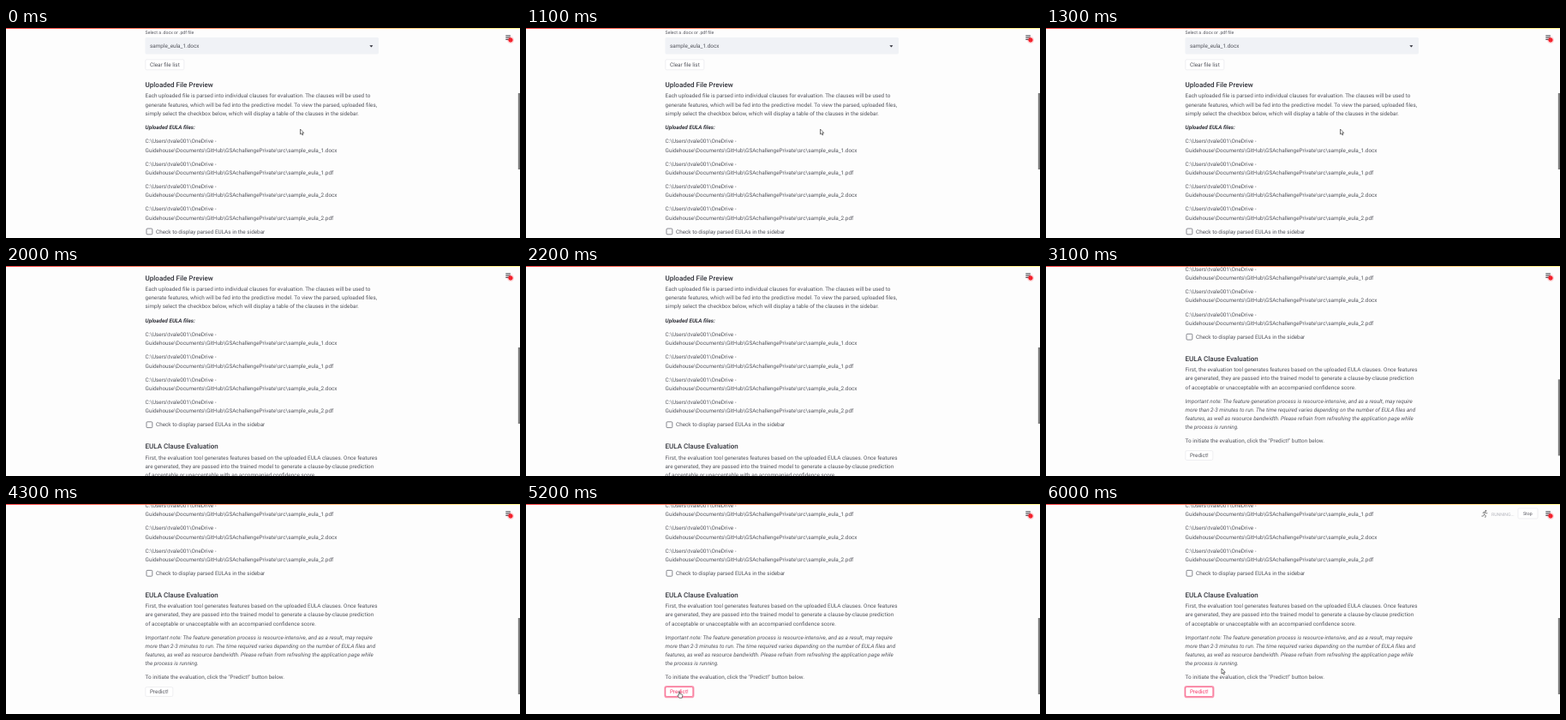
An HTML page for the animation above (6100 ms loop, 600 px wide and 245 px high).

```html
<!DOCTYPE html>
<html lang="en">
<head>
<meta charset="utf-8">
<title>Clause evaluation</title>
<style>
  html, body { margin: 0; width: 100%; height: 100%; overflow: hidden; background: #fdfdfd; }
  svg { display: block; width: 600px; height: 245px; }
  text { font: 6.36px Roboto, sans-serif; fill: #54555d; white-space: pre; text-rendering: geometricPrecision; }
  .head { font-size: 8px; font-weight: 500; fill: #33343c; }
  .label { font-size: 5.2px; }
  .note { font-style: italic; }
  .strong { font-style: italic; font-weight: 700; fill: #33343c; }
  .box { fill: #fff; stroke: #e4e5ea; stroke-width: .6; }
  .hot .box { stroke: #f63366; }
  .hot text { fill: #f63366; }
</style>
</head>
<body>
<svg viewBox="0 0 600 245">
  <defs>
    <linearGradient id="bar"><stop stop-color="#f6403f"/><stop offset="1" stop-color="#fff38a"/></linearGradient>
    <radialGradient id="glow"><stop offset=".5" stop-color="#f5222d"/><stop offset=".6" stop-color="#f5222d" stop-opacity=".3"/><stop offset="1" stop-color="#f5222d" stop-opacity="0"/></radialGradient>
  </defs>
  <g id="page">
    <rect x="162.5" y="11" width="272.5" height="19.5" rx="1.5" fill="#f0f2f6"/>
    <path d="M424.4 20.2h4l-2 2.2z" fill="#262730"/>
    <rect class="box" x="162.8" y="36.8" width="45" height="12" rx="1.5"/>
    <rect x="164" y="234" width="6.8" height="6.8" rx="1" fill="#fff" stroke="#6a6b74" stroke-width=".8"/>
    <g id="predict">
      <rect id="ring" x="162.2" y="369.4" width="33.4" height="12.6" rx="2" fill="none" stroke="#f63366" stroke-opacity=".5" stroke-width="1.6"/>
      <rect class="box" x="162.8" y="370.2" width="32" height="11" rx="1.5"/>
    </g>
  </g>
  <rect width="600" height="1" fill="url(#bar)"/>
  <rect id="thumb" x="597.8" y="76" width="2.2" height="89" fill="#7c7c7c"/>
  <path d="M583.3 9h5.6m-5.6 2.2h5.6m-5.6 2.2h5.6" stroke="#33343c" stroke-width="1"/>
  <circle cx="589" cy="14" r="4.6" fill="url(#glow)"/>
  <g id="status">
    <circle cx="513.4" cy="8" r="1" fill="#777"/>
    <path d="M512.6 9.3l-1.2 3 2 1.3-.8 2.4M511.4 12.3l-1 1.8h-2M510 11l.6-1.5 2 -.2 1.2 1.6 1.6-.2" fill="none" stroke="#777" stroke-width=".9"/>
    <rect class="box" x="551" y="5" width="23" height="12" rx="1.5"/>
  </g>
  <g id="cursor" fill="#fff" stroke="#222" stroke-width=".6" stroke-linejoin="round">
    <path id="arrow" d="M0 0v6l1.4-1.2 1 2.2 1-.5-1-2.1h1.8z"/>
    <path id="hand" d="M-.7 0q.7-.6 1.3 0v2.6l2.6.6q.7.3.6 1.2l-.6 2.8h-3.4l-2-2.8q.3-.9 1.5 0z"/>
  </g>
</svg>
<script>
const LOOP = 6100, NOTCH = 52.2;
const $ = id => document.getElementById(id);

// y is the vertical middle of the first line
function write(parent, x, y, lines, cls = '') {
  lines.split('\n').forEach((line, i) => {
    const el = document.createElementNS('http://www.w3.org/2000/svg', 'text');
    el.setAttribute('x', x);
    el.setAttribute('y', y + 2.2 + i * 10.2);
    el.setAttribute('class', cls);
    el.textContent = line;
    $(parent).append(el);
  });
}

const LEFT = 162.6;
write('page', LEFT, 4.6, 'Select a .docx or .pdf file', 'label');
write('page', 168, 21, 'sample_eula_1.docx');
write('page', 168, 43, 'Clear file list');
write('page', LEFT, 67.1, 'Uploaded File Preview', 'head');
write('page', LEFT, 79.1, `Each uploaded file is parsed into individual clauses for evaluation. The clauses will be used to
generate features, which will be fed into the predictive model. To view the parsed, uploaded files,
simply select the checkbox below, which will display a table of the clauses in the sidebar.`);
write('page', LEFT, 116, 'Uploaded EULA files:', 'strong');
['1.docx', '1.pdf', '2.docx', '2.pdf'].forEach((file, i) =>
  write('page', LEFT, 132.2 + i * 26.3, String.raw`C:\Users\tvale001\OneDrive -
Guidehouse\Documents\GitHub\GSAchallengePrivate\src\sample_eula_` + file));
write('page', 175, 237.3, 'Check to display parsed EULAs in the sidebar');
write('page', LEFT, 263.2, 'EULA Clause Evaluation', 'head');
write('page', LEFT, 275.7, `First, the evaluation tool generates features based on the uploaded EULA clauses. Once features
are generated, they are passed into the trained model to generate a clause-by-clause prediction
of acceptable or unacceptable with an accompanied confidence score.`);
write('page', LEFT, 312.1, `Important note: The feature generation process is resource-intensive, and as a result, may require
more than 2-3 minutes to run. The time required varies depending on the number of EULA files and
features, as well as resource bandwidth. Please refrain from refreshing the application page while
the process is running.`, 'note');
write('page', LEFT, 358.6, 'To initiate the evaluation, click the "Predict!" button below.');
write('predict', 168, 375.7, 'Predict!');
write('status', 520, 11.6, 'RUNNING...', 'label');
write('status', 557, 11.2, 'Stop', 'label');
$('status').querySelector('.label').style.fill = '#b5b6bd';

const ramp = (t, start, span) => Math.min(1, Math.max(0, (t - start) / span));
const easeOut = p => 1 - (1 - p) ** 3;
const easeInOut = p => p * p * (3 - 2 * p);
const show = (id, on) => $(id).style.display = on ? '' : 'none';

function draw(t) {
  const scroll = NOTCH * [1350, 2400, 2900].reduce((sum, at) => sum + easeOut(ramp(t, at, 300)), 0);
  $('page').setAttribute('transform', `translate(0 ${-scroll})`);
  $('thumb').setAttribute('y', 76 + scroll * .364);

  const go = easeInOut(ramp(t, 4400, 450)), leave = easeInOut(ramp(t, 5600, 300));
  const x = 343.5 - 164.5 * go + 26 * leave, y = 118 + 101 * go - 27 * leave;
  $('cursor').setAttribute('transform', `translate(${x} ${y})`);
  show('cursor', t < 1350 || t >= 4400);
  const over = x < 195 && y > 213;
  show('hand', over);
  show('arrow', !over);

  const clicked = t >= 5200;
  $('predict').setAttribute('class', over || clicked ? 'hot' : '');
  show('ring', clicked);
  show('status', t >= 5400);
}

function tick() {
  draw(performance.now() % LOOP);
  requestAnimationFrame(tick);
}
tick();
</script>
</body>
</html>
```
